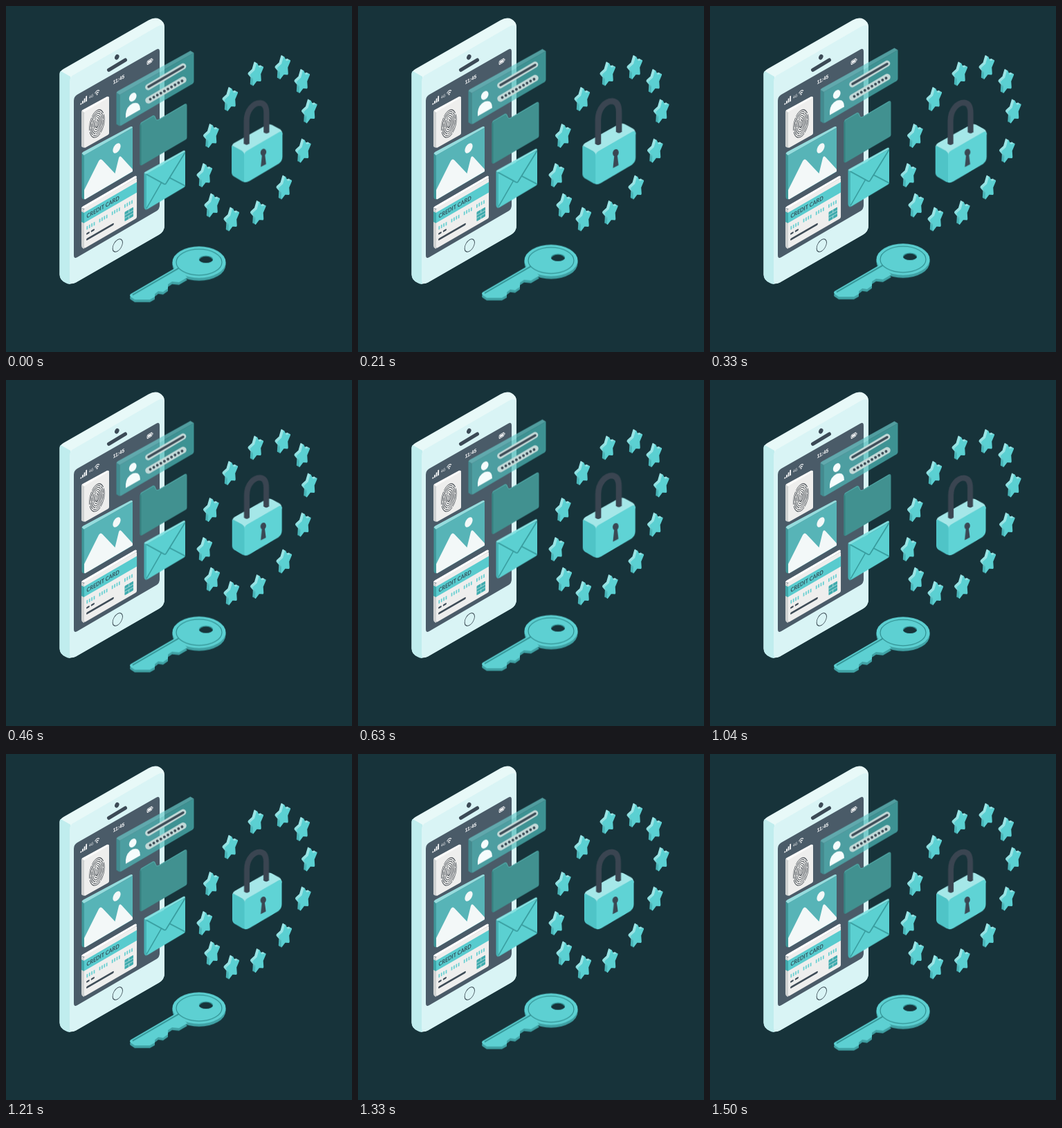
Write an HTML page without scripts that moves like this. It is 500 px wide and 500 px high and loops after 1.54 s.

```html
<!DOCTYPE html>
<html lang="en">
<head>
<meta charset="utf-8">
<title>Mobile data security</title>
<style>
html, body { margin: 0; width: 100%; height: 100%; overflow: hidden; background: #17333a; }
svg { display: block; width: 100%; height: 100%; }
text { fill: #fff; font-family: "Liberation Sans", Arial, sans-serif; }
.line { fill: none; stroke-linecap: round; stroke-linejoin: round; }
.float { animation: float 1540ms linear -40ms infinite; }
.pulse { transform-origin: 362.5px 195.5px; animation: pulse 1540ms linear infinite; }
@keyframes float {
  0%, 100% { transform: translateY(.7px); }
  50% { transform: translateY(-8.7px); }
}
@keyframes pulse {
  0% { transform: scale(1.026); }
  11.7% { transform: scale(1.085); }
  28.6% { transform: scale(1); }
  45.5% { transform: scale(1.085); }
  62.4%, 100% { transform: scale(1); }
}
</style>
</head>
<body>
<svg viewBox="0 0 500 500">
  <defs>
    <linearGradient id="starEdge" x2="0" y2="1">
      <stop offset=".3" stop-color="#9be5e6"/>
      <stop offset=".8" stop-color="#48b4b7"/>
    </linearGradient>
    <path id="starFace" stroke-width="3" stroke-linejoin="round" d="M0-15 4.8-6.6 14.3-4.6 7.8 2.5 8.8 12.1 0 8.2-8.800 12.1-7.800 2.5-14.300-4.6-4.800-6.600Z"/>
    <g id="star">
      <g fill="url(#starEdge)" stroke="url(#starEdge)">
        <use href="#starFace" transform="matrix(.6 -.36 0 .98 -2 -1.2)"/>
        <use href="#starFace" transform="matrix(.6 -.36 0 .98 -.8 -.5)"/>
        <use href="#starFace" transform="matrix(.6 -.36 0 .98 .4 .2)"/>
      </g>
      <use href="#starFace" transform="matrix(.6 -.36 0 .98 1.6 .8)" fill="#5bd0d2" stroke="#5bd0d2"/>
    </g>
    <path id="blade" d="M247 377 180 416Q178 418 180 420L186 424H208L215 420V416L220 412 227 413 234 408V402L240 398 250 399 262 392Z"/>
    <ellipse id="bow" cx="279" cy="370" rx="38.5" ry="22.8"/>
    <path id="digits" d="M0 0v5M3.9 0v5M7.8 0v5M11.7 0v5"/>
  </defs>

  <!-- phone -->
  <path fill="#e8f9f8" d="M77.5 99Q77.5 94 83 91L206 20.500Q215 15.500 222 19 229 23 229 30V317Q229 326 221 330.500L101 399.500Q93 403 87 400 77.500 396 77.500 388Z"/>
  <path fill="#c0edee" d="M77.5 98Q77.5 95 79 94L93 102V402Q89 402 86 400 77.5 396 77.5 388Z"/>
  <path fill="#d9f4f5" d="M92 109Q92 103 97 100L218 30Q229 24 229 34V317Q229 326 221 330.5L101 399.5Q92 404 92 396Z"/>
  <path fill="#4a5b68" d="M98 137Q98 131 103 128L217 63Q222 60 222 66V288Q222 293 218 296L103 363Q98 366 98 360Z"/>
  <path class="line" stroke="#3c4a56" stroke-width="5" d="M148.5 92.5 172.5 78"/>
  <ellipse cx="160.3" cy="73.8" rx="3" ry="4" fill="#3c4a56" transform="rotate(25 160.3 73.8)"/>
  <circle r="8.3" class="line" stroke="#35454f" transform="matrix(.866 -.5 0 1 161.3 346)"/>

  <!-- status bar -->
  <g transform="matrix(.866 -.5 0 1 107.5 143)">
    <path stroke="#fff" stroke-width="2" d="M1 0v-2M4 0v-4M7 0v-6M10 0v-8"/>
    <text x="14.5" y="-1.5" font-size="5.6">4G</text>
    <g class="line" stroke="#fff" stroke-width="1.1">
      <path d="M24.5-5Q28-8.5 31.500-5M26-3Q28-5 30-3"/>
      <circle cx="28" cy="-1.2" r=".4"/>
    </g>
    <text x="54.5" y="-2.5" font-size="7.6" font-weight="bold">11:45</text>
    <g transform="translate(111.5 -7.5)">
      <rect width="8" height="5" rx="1.2" class="line" stroke="#fff"/>
      <path fill="#fff" d="M1.2 1.2h5.6v2.6H1.2ZM8.7 1.5h1v2h-1Z"/>
    </g>
  </g>

  <!-- fingerprint -->
  <path fill="#cfd2d2" d="M109 153Q109 151 111 150L146 131 149 133 149 184 115 204Q112 206 109 203Z"/>
  <path fill="#fbfbfa" d="M109.5 151 146 131Q149 130 149 133L113 154Z"/>
  <path fill="#eeeeed" d="M113 156Q113 153 115 152L147 133.5Q149 132.5 149 135V183.5Q149 185.5 147 186.5L115 204.5Q113 205.5 113 203Z"/>
  <g class="line" stroke="#4b5157" stroke-width=".95" transform="matrix(.866 -.5 0 1 131.3 170)">
    <ellipse rx="12.5" ry="19" stroke-dasharray="17 2 24 3"/>
    <ellipse rx="10.6" ry="16.6" stroke-dasharray="28 2 11 2"/>
    <ellipse rx="8.7" ry="14" stroke-dasharray="19 2"/>
    <ellipse rx="6.7" ry="11.3" stroke-dasharray="25 2 9 2"/>
    <ellipse rx="4.7" ry="8.4" stroke-dasharray="14 2"/>
    <ellipse rx="2.7" ry="5.4" stroke-dasharray="17 2"/>
    <path d="M0-3Q1 1 0 6"/>
  </g>

  <!-- picture -->
  <path fill="#3f9799" d="M109.5 213 113 215V279.5Q109.5 279 109.5 276Z"/>
  <path fill="#96dcdd" d="M109.5 213Q110 211.5 112 210.5L179.5 174.5Q183 173 183 176L113 216Z"/>
  <path fill="#57b4b7" d="M113 215.5 183 176V238Q183 239.5 181 240.5L115 279Q113 280 113 278Z"/>
  <path fill="#f3f8f8" d="M113 266 134 224Q136.500 219.500 139.500 223L157.500 242 163 219.500Q164.500 215.500 167.500 219L183 236V239L115 279Q113 280 113 278Z"/>
  <circle r="6.5" fill="#f3f8f8" transform="matrix(.866 -.5 0 1 160 205.5)"/>

  <!-- payment card -->
  <path fill="#cfd2d2" d="M109 292 113 294V351Q109 350 109 346Z"/>
  <path fill="#fff" d="M109 292Q109 290.5 111 289.5L185 246.5Q189 244 189 248L113 293Z"/>
  <path fill="#3fa7aa" d="M109 297 113 299V314L109 312Z"/>
  <g transform="matrix(.866 -.5 0 1 113 292)">
    <rect width="87.8" height="58.5" rx="2" fill="#eeeeed"/>
    <path fill="#58cbce" d="M0 6.5h87.8v15H0Z"/>
    <text x="4" y="17" font-size="8.4" font-weight="bold" style="fill:#33505a;font-family:Lato,sans-serif">CREDIT CARD</text>
    <g stroke="#66cfd1" stroke-width="2">
      <use href="#digits" x="5" y="28.5"/>
      <use href="#digits" x="26" y="28.5"/>
      <use href="#digits" x="47" y="28.5"/>
      <use href="#digits" x="68" y="28.5"/>
    </g>
    <g class="line" stroke="#3f4c57">
      <path stroke-width="2.5" d="M4.8 39.5h3M12.5 39.5h3.5"/>
      <path stroke-width="3" d="M5 47.5h43"/>
    </g>
    <rect x="67.5" y="39.5" width="14.5" height="13.5" rx="1" fill="#41abae"/>
    <path class="line" stroke="#c5e6e6" stroke-width=".7" d="M67.5 44h14.5M67.5 48.5h14.5M74.7 39.5v4.5M74.7 48.5v4.5"/>
  </g>

  <!-- floating panels -->
  <g class="float">
    <g fill-opacity=".7">
      <path fill="#3f9fa1" d="M159.5 125 164.5 128V173.5L159.5 170.5Z"/>
      <path fill="#6bcbcb" d="M159.5 125Q160 123.5 162 122.5L266.5 64.5 271.5 67.5 164.5 128Z"/>
      <path fill="#4fbbb9" d="M164.5 128 271.5 67.5V109Q271.5 111 269.5 112.2L166.5 172.5Q164.5 173.5 164.5 171.5Z"/>
    </g>
    <g fill="#f5fcfc">
      <circle r="6" transform="matrix(.9 -.35 0 1 183.2 131.5)"/>
      <path d="M173 161.5V156Q174 145 183 140.5 194 137 194 149.5Z"/>
    </g>
    <g class="line">
      <path stroke="#c3d9d8" stroke-width="8.8" d="M205.5 117 256 87"/>
      <path stroke="#3f4d58" stroke-width="3.5" d="M206 116.5 256 87.5"/>
      <path stroke="#c3d9d8" stroke-width="9.5" d="M206 136 256 106.5"/>
      <path stroke="#3f4d58" stroke-width="4" stroke-dasharray="0 5.9" d="M208.5 134.5 256 107"/>
    </g>

    <path fill="#419190" d="M193.5 172Q193.5 169 196 167.5L212 158Q214.5 157 215.5 159.5L216.5 163Q217.5 165.5 220 164L258 141.5Q261.5 140 261.5 143V190Q261.5 192 259.5 193L197 229.5Q193.5 231 193.5 228Z"/>
    <path class="line" stroke="#57aead" d="M195 169 213 158.5Q215 158 216 162 217 166 220 164.5L259 142"/>
    <path fill="#36807f" d="M193.5 171 195.5 172V229.5Q193.5 230 193.5 228Z"/>

    <path fill="#46b2b5" d="M199.5 241 203 243V294.5Q199.5 293.5 199.5 290Z"/>
    <path fill="#86e2e2" d="M199.5 241Q200 240 202 239L256 209Q259 207.5 259 210.5L203 243Z"/>
    <path fill="#5bd0d1" d="M203 242.5 259 210.5V259Q259 261 257 262L205 293Q203 294.5 203 292Z"/>
    <path class="line" stroke="#36999b" stroke-width="1.5" d="M203 243 228.5 257Q230.5 258 232 255L258.5 212M203.5 291.5 224.5 255M236.5 248 258.5 259.5"/>

    <!-- key -->
    <g fill="#40a2a5">
      <use href="#blade" y="3.7"/>
      <use href="#bow" y="4"/>
      <path d="M240.5 370h77v4h-77Z"/>
    </g>
    <g fill="#5dd0d2">
      <use href="#blade"/>
      <use href="#bow"/>
    </g>
    <g class="line" stroke="#329193">
      <path stroke-width="1.8" d="M183.5 417 249 379"/>
      <ellipse cx="279" cy="370" rx="33" ry="18.8" stroke-width="1.2"/>
    </g>
    <ellipse cx="289" cy="365.8" rx="10.2" ry="5.2" fill="#318f92"/>
    <path fill="#17333a" d="M279 367Q282 361.8 289 361.8T299 367Q296 371 289 371T279 367Z"/>
  </g>

  <!-- stars -->
  <use href="#star" x="361" y="98"/>
  <use href="#star" x="400" y="88.5"/>
  <use href="#star" x="428" y="108.5"/>
  <use href="#star" x="438.5" y="152"/>
  <use href="#star" x="429.5" y="209"/>
  <use href="#star" x="402" y="262"/>
  <use href="#star" x="364.5" y="298.5"/>
  <use href="#star" x="326" y="308"/>
  <use href="#star" x="298" y="288"/>
  <use href="#star" x="287" y="244.5"/>
  <use href="#star" x="296.5" y="187.5"/>
  <use href="#star" x="324" y="134.5"/>

  <!-- padlock -->
  <g class="pulse">
    <path fill="#a5e7e8" d="M327 205Q327 200 331 197.700L376 172.500Q380 170.500 384 172.500L395 178.500Q398.500 181 398.500 186L345 216Z"/>
    <path fill="#4fc4c7" d="M327 204Q327 201 329 202L341 208.5Q345 211 345 215V253Q343 252.5 341 251.5L330 245Q327 243 327 239Z"/>
    <path fill="#5fd3d5" d="M344.5 216Q344.5 211 349 208.5L393 183Q398.5 180 398.5 185V217Q398.5 223.500 393.500 227L352 251.5Q347.5 254 344.5 253Z"/>
    <path class="line" style="stroke-linecap:butt" stroke="#3a4551" stroke-width="8" d="M348 199V167C348 151 358 141.5 367 141.5 373.5 142 376 148 376 156V183"/>
    <path fill="#3a4551" d="M344 198.5h8q-4 4-8 0ZM372 182.5h8q-4 4-8 0Z"/>
    <g fill="#3a4854">
      <ellipse cx="371.7" cy="211" rx="4" ry="5" transform="rotate(15 371.7 211)"/>
      <path d="M370 212 368 231.5 375.5 227.5 373.5 211Z"/>
    </g>
  </g>
</svg>
</body>
</html>
```
